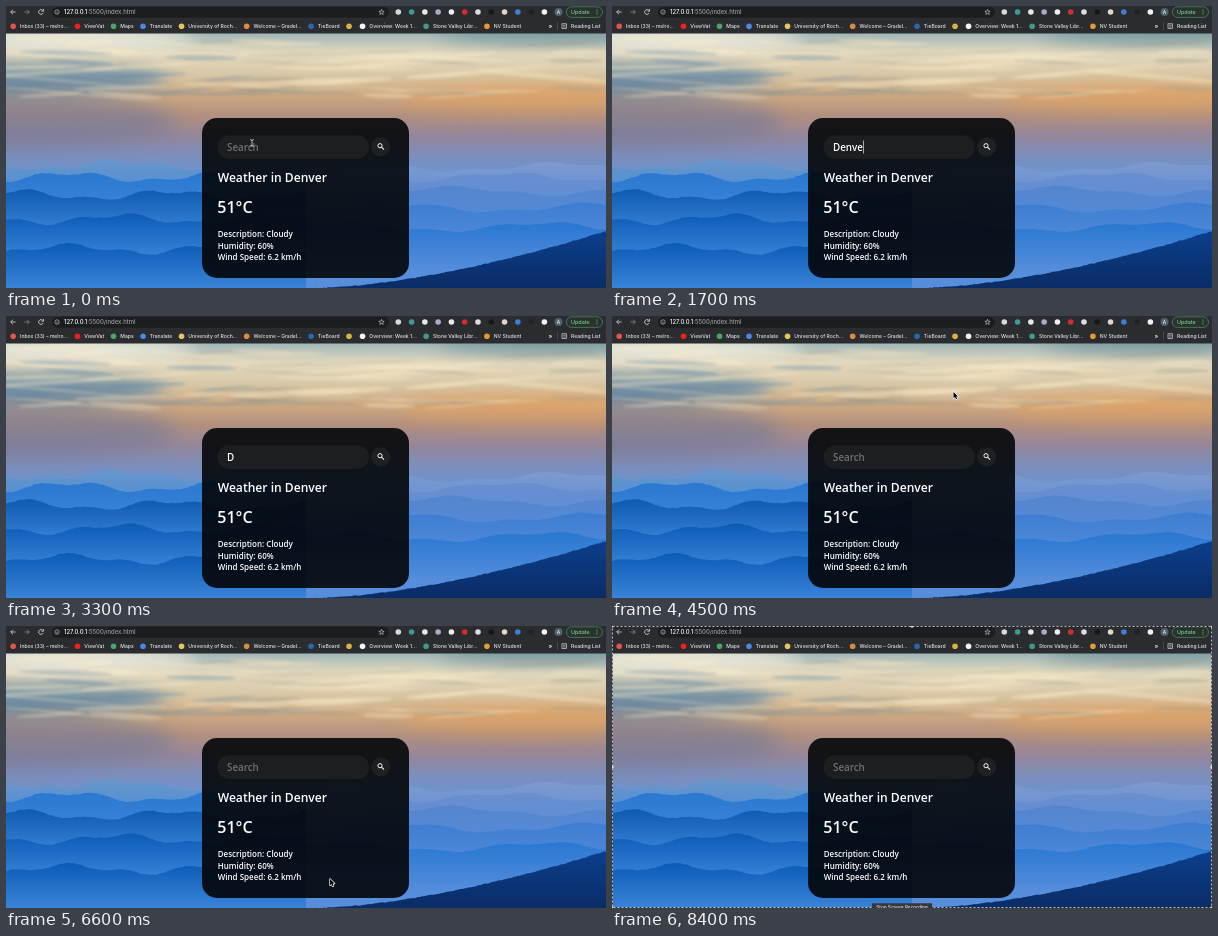
Recreate the animation shown at these times as an HTML page with a canvas. Size 600x282 px, loop 8.5 s.

```html
<!DOCTYPE html>
<html lang="en">
<head>
<meta charset="utf-8">
<title>Weather search</title>
<style>
html, body { margin: 0; width: 100%; height: 100%; overflow: hidden; background: #000; }
canvas { display: block; width: 600px; height: 282px; }
</style>
</head>
<body>
<canvas id="stage"></canvas>
<script>
const W = 600, H = 282, TOP = 27, LOOP = 8500, STEP = 100;
const UI = 'Inter, "Liberation Sans", sans-serif';
const CARD = '"Open Sans", "Noto Sans", sans-serif';
const scale = Math.max(1, window.devicePixelRatio || 1);

function sized(canvas) {
  canvas.width = W * scale;
  canvas.height = H * scale;
  const c = canvas.getContext('2d');
  c.scale(scale, scale);
  return c;
}
const stage = sized(document.getElementById('stage'));
const backdrop = document.createElement('canvas');
let g = sized(backdrop);

let seed = 29;
function rand(low = 0, high = 1) {
  seed = (seed * 16807) % 2147483647;
  return low + (high - low) * seed / 2147483647;
}
const smooth = k => k * k * (3 - 2 * k);

function text(str, x, y, font, color, align = 'left') {
  g.font = font;
  g.fillStyle = color;
  g.textAlign = align;
  g.fillText(str, x, y);
  return g.measureText(str).width;
}
function box(x, y, w, h, r, color) {
  g.fillStyle = color;
  g.beginPath();
  g.roundRect(x, y, w, h, r);
  g.fill();
}
function oval(x, y, rx, ry, color, tilt = 0) {
  g.fillStyle = color;
  g.beginPath();
  g.ellipse(x, y, rx, ry, tilt, 0, 7);
  g.fill();
}
const disc = (x, y, r, color) => oval(x, y, r, r, color);
function ring(x, y, r, color, width, from = 0, to = 7) {
  g.strokeStyle = color;
  g.lineWidth = width;
  g.beginPath();
  g.arc(x, y, r, from, to);
  g.stroke();
}
function line(color, width, ...points) {
  g.strokeStyle = color;
  g.lineWidth = width;
  g.beginPath();
  points.forEach(([x, y]) => g.lineTo(x, y));
  g.stroke();
}
function vertical(y0, y1, ...colors) {
  const fill = g.createLinearGradient(0, y0, 0, y1);
  colors.forEach((color, i) => fill.addColorStop(i / (colors.length - 1), color));
  return fill;
}

// ---- landscape ----
function sky() {
  g.save();
  g.beginPath();
  g.rect(0, TOP, W, 145);
  g.clip();
  g.fillStyle = vertical(TOP, 170,
    '#9fb6b8', '#e4d9bd', '#d8c8a8', '#cfaa82', '#b2907f', '#958699', '#7c8ebc', '#6995d0');
  g.fillRect(0, TOP, W, H);

  g.filter = `blur(${9 * scale}px)`;
  oval(10, 74, 150, 17, 'rgba(78,124,165,.75)');
  oval(0, 115, 170, 26, 'rgba(105,118,155,.5)');
  oval(60, 32, 130, 12, 'rgba(250,244,226,.85)');
  oval(530, 92, 140, 13, 'rgba(229,160,90,.6)');
  oval(540, 28, 110, 8, 'rgba(92,130,140,.7)');

  g.filter = `blur(${1.5 * scale}px)`;
  for (let i = 0; i < 60; i++) {
    const x = rand(0, W), y = rand(30, 92);
    const shade = x < 220 ? '88,132,168' : '150,148,138';
    const tone = rand() < 0.6 ? '253,237,202' : shade;
    oval(x, y, rand(25, 85), rand(0.8, 3), `rgba(${tone},.35)`, rand(-0.1, 0.1));
  }
  g.restore();
}

function hill(from, to, height, fill) {
  g.fillStyle = fill;
  g.beginPath();
  g.moveTo(from, H);
  for (let x = from; x <= to; x += 2) g.lineTo(x, height(x) + rand(-0.4, 0.4));
  g.lineTo(to, H);
  g.fill();
}

// The two valley sides meet behind the card.
function mountains() {
  for (let i = 0; i < 5; i++) {
    const left = 159 + 9 * i + 3 * i * i, right = 161 + 9 * i + 1.5 * i * i;
    hill(0, 300, x => left + 4 * Math.sin(x / 24 + i * 2.1) + 2 * Math.sin(x / 9 + i),
      vertical(left - 5, left + 45,
        `hsl(212, ${Math.min(88, 48 + 18 * i)}%, ${Math.max(38, 60 - 11 * i)}%)`, 'hsl(212, 70%, 56%)'));
    hill(300, W, x => right + 4 * Math.sin(x / 32 + i * 1.7) + 1.5 * Math.sin(x / 11 + i),
      vertical(right - 5, right + 45,
        `hsl(${220 - 2 * i}, ${44 + 6 * i}%, ${65 - 4 * i}%)`, 'hsl(215, 65%, 60%)'));
  }
  hill(310, W, x => H - 57 * ((x - 310) / 290) ** 1.6, vertical(225, H, '#0b3f8c', '#0a2c66'));
}

// ---- browser ----
const PALE = '#d5d7da';

function toolbar() {
  box(0, 0, W, 27.5, 0, '#2b2c2f');
  box(46, 0.8, 337, 11, 5.5, '#1c1d1f');
  [[7, 1, PALE], [21, -1, '#85888c']].forEach(([x, way, color]) => {
    line(color, 0.8, [x, 3.7], [x - 2.3 * way, 6], [x, 8.3]);
    line(color, 0.8, [x - 2.3 * way, 6], [x + 2.6 * way, 6]);
  });
  ring(35, 6, 2.4, PALE, 0.8, 0.4, 5.6);
  line(PALE, 0.8, [37.5, 3], [37.5, 5.2], [35.3, 5.2]);
  ring(51, 6, 2.2, PALE, 0.6);
  line(PALE, 0.6, [51, 5.6], [51, 7.3]);

  const urlFont = `500 5.95px ${UI}`;
  const hostWidth = text('127.0.0.1', 58, 8.2, urlFont, '#f1f2f3');
  text(':5500/index.html', 58 + hostWidth, 8.2, urlFont, '#9a9da1');

  const star = Array.from({ length: 11 }, (_, i) => {
    const a = i * Math.PI / 5 - Math.PI / 2, r = i % 2 ? 1.2 : 2.8;
    return [375.5 + r * Math.cos(a), 6.2 + r * Math.sin(a)];
  });
  line(PALE, 0.6, ...star);

  const addons = ['#d8d9dc', '#3f9a93', '#e8e8ea', '#a9acc8', '#eee', '#d02e2e',
    '#dcdde0', '#15171b', '#e0d5c8', '#3d7fd0', '#202226', '#f2f2f2'];
  addons.forEach((color, i) => disc(392.3 + i * 13.28, 6, 2.8, color));

  disc(552.5, 6, 4, '#51626c');
  text('A', 552.5, 7.8, `500 4.8px ${UI}`, '#eee', 'center');
  box(560.3, 0.8, 36.2, 10.6, 5.3, '#27332c');
  g.strokeStyle = '#5f9b72';
  g.stroke();
  text('Update', 565, 8, `500 5.4px ${UI}`, '#81c995');
  for (let y = 4; y <= 8; y += 2) disc(591, y, 0.6, '#81c995');
}

function bookmarks() {
  const font = `500 5.05px ${UI}`, y = 22.1;
  const marks = [
    ['Inbox (33) – melro...', '#e0564a'], ['ViewVat', '#f02020'], ['Maps', '#4aa567'],
    ['Translate', '#4b87e8'], ['University of Roch...', '#e5c75c'], ['Welcome – Gradel...', '#dc8a3c'],
    ['TieBoard', '#2867b2'], ['', '#d8b443'], ['Overview: Week 1...', '#f4f4f4'],
    ['Stone Valley Libr...', '#3f9b84'], ['NV Student', '#e59a35']
  ];
  let x = 14;
  for (const [label, color] of marks) {
    disc(x - 6.8, 20.2, 2.8, color);
    x += text(label, x, y, font, '#e3e4e6') + (label ? 16.2 : 13.5);
  }
  text('»', 542.5, y, `600 6px ${UI}`, '#e3e4e6');
  box(551, 16, 0.5, 8, 0, '#606266');
  g.strokeStyle = PALE;
  g.lineWidth = 0.7;
  g.strokeRect(556, 17.8, 4.6, 4.8);
  for (const row of [19.3, 21]) line(PALE, 0.6, [557, row], [559.6, row]);
  text('Reading List', 565, y, font, '#e3e4e6');
}

// ---- weather card ----
function card() {
  box(196, 112, 207, 160, 15, 'rgba(3,5,7,.89)');
  box(211.5, 129.3, 151.5, 23.6, 11.8, '#1d1e20');
  disc(374.7, 140.8, 9.6, '#1f2022');
  ring(374, 139.7, 2.1, '#f5f5f5', 1);
  line('#f5f5f5', 1.1, [375.5, 141.2], [378, 143.7]);
  text('Weather in Denver', 211.7, 176.2, `600 12.1px ${CARD}`, '#fff');
  text('51°C', 211.3, 207, `600 16px ${CARD}`, '#fff');
  ['Description: Cloudy', 'Humidity: 60%', 'Wind Speed: 6.2 km/h'].forEach((row, i) =>
    text(row, 211.7, 231.4 + i * 11.3, `600 8px ${CARD}`, '#fff'));
}

// ---- moving parts ----
function typedLength(t) {
  if (t < 900) return 0;
  if (t < 2800) return Math.min(6, 1 + Math.floor((t - 900) / 200));
  return Math.max(0, 5 - Math.floor((t - 2800) / 120));
}

function field(t) {
  const typed = 'Denver'.slice(0, typedLength(t));
  const font = `600 9.8px ${CARD}`;
  const width = text(typed || 'Search', 221, 144.6, font, typed ? '#fff' : '#707174');
  const focused = t >= 700 && t < 3900;
  const blinkOn = t < 2000 || (t + 300) % 1000 < 500;
  if (focused && blinkOn) box(221.3 + (typed ? width : 0), 134.5, 0.7, 13, 0, '#e8e8e8');
}

// Each visit of the pointer: [time, x, y] key points.
const VISITS = [
  [[0, 246, 137], [800, 246, 137]],
  [[3600, 246, 137], [4400, 341.5, 76], [4600, 341.5, 76], [5200, 356, 290]],
  [[6200, 335, 290], [6500, 324, 253], [6900, 324, 253], [7400, 316, 290]]
];

function pointerAt(t) {
  const visit = VISITS.find(v => t >= v[0][0] && t < v.at(-1)[0]);
  if (!visit) return null;
  const i = visit.findIndex(key => key[0] > t);
  const [t0, x0, y0] = visit[i - 1], [t1, x1, y1] = visit[i];
  const e = smooth((t - t0) / (t1 - t0));
  return [x0 + (x1 - x0) * e, y0 + (y1 - y0) * e];
}

function pointer(t) {
  const spot = pointerAt(t);
  if (!spot) return;
  const [x, y] = spot;
  if (x > 212 && x < 363 && y > 129 && y < 153) {
    line('#ddd', 0.8, [x, y - 3], [x, y + 3]);
    for (const d of [-3.4, 3.4]) line('#ddd', 0.8, [x - 1.8, y + d], [x, y + d * 0.8], [x + 1.8, y + d]);
    return;
  }
  g.save();
  g.translate(x, y);
  const arrow = new Path2D('M0 0V6.3L1.5 5 2.5 7.3 3.6 6.8 2.6 4.6 4.6 4.5Z');
  g.lineJoin = 'round';
  g.lineWidth = 1.3;
  g.strokeStyle = '#fff';
  g.stroke(arrow);
  g.fillStyle = '#000';
  g.fill(arrow);
  g.restore();
}

function recordingFrame(t) {
  if (t < 7600) return;
  g.lineWidth = 1;
  g.strokeStyle = 'rgba(30,32,36,.7)';
  g.strokeRect(0.5, 0.5, W - 1, H - 1);
  g.setLineDash([2, 2]);
  g.strokeStyle = 'rgba(225,228,232,.8)';
  g.strokeRect(0.5, 0.5, W - 1, H - 1);
  g.setLineDash([]);
  for (let i = 0; i < 9; i++)
    if (i !== 4) disc(i % 3 * W / 2, Math.floor(i / 3) * H / 2, 1.7, '#dcdee0');
  if (t < 8000) return;
  box(260, 277.3, 60, 8, 1, '#35373a');
  text('Stop Screen Recording', 290, 283.2, `500 4.7px ${UI}`, '#e6e6e6', 'center');
}

[sky, mountains, toolbar, bookmarks, card].forEach(paint => paint());
g = stage;
const start = performance.now();

function frame() {
  const elapsed = (performance.now() - start) % LOOP;
  const t = Math.floor(elapsed / STEP) * STEP;
  g.drawImage(backdrop, 0, 0, W, H);
  field(t);
  recordingFrame(t);
  pointer(t);
  requestAnimationFrame(frame);
}
frame();
</script>
</body>
</html>
```
